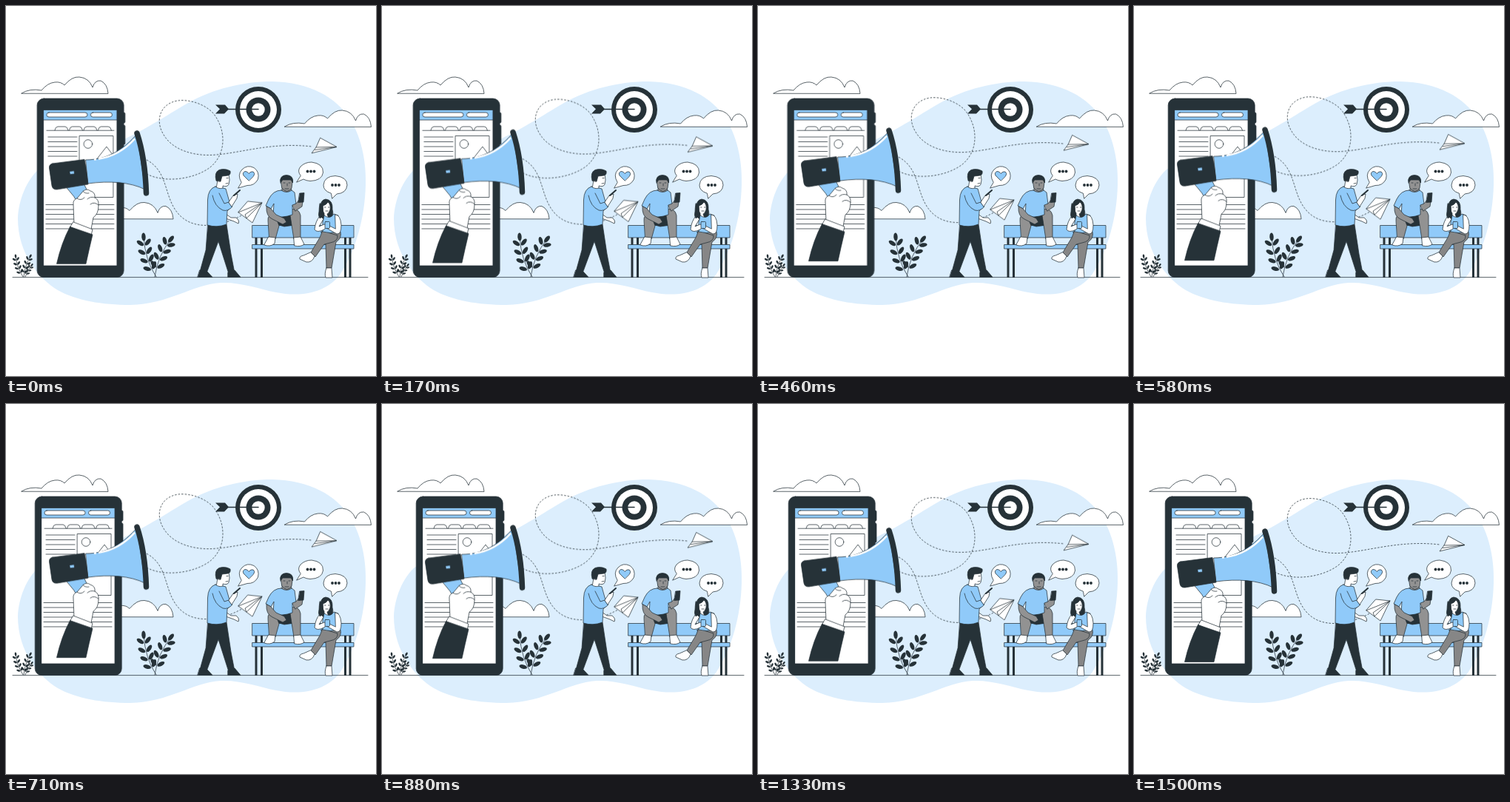
An HTML page for the animation above (1.54 s loop, 500 by 500 pixels).

```html
<!DOCTYPE html>
<html lang="en">
<head>
<meta charset="utf-8">
<title>Social promotion</title>
<style>
  html, body { margin: 0; width: 100%; height: 100%; overflow: hidden; background: #fff; }
  svg { display: block; width: 100%; height: 100%; }
  .art { --dark: #263238; --blue: #90caf9; stroke: var(--dark); stroke-width: .75; stroke-linejoin: round; stroke-linecap: round; }
  .w { fill: #fff; }
  .b { fill: var(--blue); }
  .d { fill: var(--dark); }
  .g { fill: #929292; }
  .p { fill: #868686; }
  .n { fill: none; }
  .flat { stroke: none; }
  .dash { fill: none; stroke-dasharray: 2.6 1.9; stroke-linecap: butt; }
  .float { animation: float 1540ms -20ms linear infinite; }
  .shake { animation: shake 1540ms -20ms linear infinite; }
  /* 1500 ms cycles followed by a 40 ms rest */
  @keyframes float {
    0%, 97.4%, 100% { transform: translateY(0); }
    48.7% { transform: translateY(-6px); }
  }
  @keyframes shake {
    0%, 97.4%, 100% { transform: translateX(0); }
    9.74%, 87.66% { transform: translateX(-1px); }
    19.48%, 77.92% { transform: translateX(2px); }
    29.22%, 48.7%, 68.18% { transform: translateX(-4px); }
    38.96%, 58.44% { transform: translateX(4px); }
  }
</style>
</head>
<body>
<svg class="art" viewBox="0 0 500 500">
  <defs>
    <path id="cloud" d="M21 118Q32 111 48 114Q56 104 66 103Q74 102 79 107Q89 95 99 96Q112 97 117 110Q120 100 128 101Q137 105 138 118Z"/>
    <path id="tab" d="M66 168Q67 163 70 163H80Q83 163 84 168"/>
    <circle id="dot" r="1.9"/>
  </defs>

  <path class="flat" fill="#dceefd" d="M16 287C17 262 28 235 44 221C75 202 120 199 160 180C195 163 215 149 246 131C280 112 320 102 360 102C410 103 446 123 465 153C482 180 487 215 486 242C485 285 473 330 452 362C434 387 400 394 365 387C340 382 318 373 290 374C250 377 220 403 168 404C130 404 95 398 70 384C45 369 16 335 16 287Z"/>
  <g class="w">
    <use href="#cloud"/>
    <use href="#cloud" x="355.5" y="45"/>
    <use href="#cloud" x="88" y="169.5"/>
  </g>
  <path class="n" d="M9 366.6H489"/>
  <g id="plants" class="d"></g>

  <!-- target -->
  <g class="flat">
    <circle class="d" cx="341" cy="140" r="31"/>
    <circle class="w" cx="341" cy="140" r="25"/>
    <circle class="d" cx="341" cy="140" r="16.5"/>
    <circle class="w" cx="341" cy="140" r="8.7"/>
    <path class="d" d="M283 133.5H296L301 139.3L295 145.5H283L289 139.3Z"/>
  </g>
  <path class="n" stroke-width="1.5" d="M290 139.4H341"/>

  <!-- bench -->
  <g>
    <path class="d" d="M338 313V367M345.500 313V367M458.500 313V367M465 313V367" stroke-width="3" stroke-linecap="butt"/>
    <rect class="b" x="333" y="296.5" width="137" height="16.5"/>
    <rect class="b" x="333" y="322.5" width="137" height="5.5"/>
  </g>

  <!-- phone -->
  <g class="shake">
    <rect class="d" x="157" y="144" width="4" height="14" rx="1.5"/>
    <rect class="d" x="157" y="161" width="4" height="26" rx="1.5"/>
    <rect class="d" x="42.2" y="125" width="117" height="241.6" rx="9"/>
    <rect class="w" x="51" y="140.5" width="99" height="210.5"/>
    <rect class="b" x="51" y="140.5" width="99" height="13.5"/>
    <rect class="w" x="55" y="144" width="55" height="6" rx="3"/>
    <rect class="w" x="114.5" y="144" width="29" height="6" rx="3"/>
    <g class="n">
      <use href="#tab"/><use href="#tab" x="19.5"/><use href="#tab" x="39"/><use href="#tab" x="58.5"/>
      <path d="M55 168.2H146M57 177H96M57 183.5H96M57 190H96M57 196.5H96M57 203H96"/>
      <rect x="99.5" y="175.5" width="45.5" height="83"/>
      <circle cx="111" cy="186.5" r="5.8"/>
      <path d="M118 213L136 190L145 202M54 268.5H146M54 275H146M54 281.5H146M54 288H146M54 294.500H146M54 301H146"/>
    </g>
  </g>

  <!-- flight paths and paper planes -->
  <g class="float">
    <path class="dash" d="M190 227C215 240 255 234 276 218C299 199 297 166 280 145C268 132 247 126 232 128C208 132 201 155 213 174C225 195 255 204 285 201C320 198 360 184 413 190"/>
    <path class="dash" d="M190 208C216 222 214 249 226 271C237 291 254 297 273 296.5C295 295 310 288 322 281"/>
    <path class="w" d="M425 178.5L447 190.5L413 199L419 191Z"/>
    <path class="n" d="M419 191L447 190.5L417.500 194.500"/>
    <path class="w" d="M327 264L346 266L333 293L314 279Z"/>
    <path class="n" d="M314 279L346 266L323 282L325 287L346 266"/>
  </g>

  <!-- megaphone -->
  <g class="float">
    <path class="b" d="M81 244L104 238L109 248L98 262Q94 263 92 258Z"/>
    <path class="b" d="M108 208C137 208 159 194 177 173L188 248C168 238 140 236 111 240Z"/>
    <path class="n" style="stroke:#fff" stroke-width="2.6" stroke-linecap="butt" d="M119 207.5L122 207.2M125 206.7C144 204 161 194 174 179.5"/>
    <path class="d" d="M63 213L106 207.5Q109 222 111 241L69 248Q63 248.5 62 243L58.5 219Q58 214 63 213Z"/>
    <path class="n" stroke-width="7.5" d="M177 172Q188 205 189.5 253"/>
    <path class="b" d="M86 223.5L92 222.8L92.6 227L86.6 227.7Z"/>
    <path class="w" d="M92 295L91 269Q90 262 96 260L104 250.5Q109 246 114 250Q121 252 120 259Q126 262 125 270Q125 281 118 286L115 302Z"/>
    <path class="n" d="M96 260Q101 264 106 259M104 250.5Q107 254 112 253M120 259Q114 257 110 261M125 269Q119 264 114 268"/>
    <path class="w" d="M91 292L117 302L115 310L87 299Z"/>
    <path class="d" d="M86.5 298.5L117 309Q112 330 108 348.5H68.5Q75 320 86.5 298.5Z"/>
  </g>

  <!-- walking man -->
  <g>
    <path class="w" d="M297 281L304 286L311 286Q316 290 314 294L308 291L297 287Z"/>
    <path class="w" d="M290 228L301 227L302 235L301 241Q299 245 293 243L293 250L284 247L286 235Z"/>
    <path class="d" d="M284 236Q281 225 288 221.5Q296 219 303 223Q304 228 300 229L292 230L290 237Z"/>
    <path class="n" d="M298 232.5H300M297 240L300 239.5"/>
    <path class="d" d="M262 357L272 359L279 366.5H259Z"/>
    <path class="d" d="M300 360L309 357L317 366.5H300Z"/>
    <path class="d" d="M273 294L298 295L304 335L309 361L301 362L287 318L271 361L262 359L270 330Z"/>
    <path class="b" d="M283 244Q273 247 272.5 262L272 296Q285 300 298 295L299 277L304 272L297 247L293 246Q288 248 283 244Z"/>
    <path class="b" d="M279 256Q282 271 293 276Q300 278 306 271L301 265L295 267L288 253"/>
    <path class="w" d="M301 265L307 256L313 254L312 260L305 271Z"/>
    <path class="n" stroke-width="2" d="M308 256L316 249"/>
  </g>

  <!-- seated man -->
  <g>
    <path class="g" d="M373 242L373 251Q379 255 386 250L385 243Z"/>
    <path class="g" d="M371 235Q371 231 379 231Q388 231 387 238L386 246Q380 255 373 246Z"/>
    <path class="d" d="M371 239Q369 229 379 228.500Q389 229 387.500 239L385 235H374Z"/>
    <path class="n" d="M375 239H377M382 239H384M380 240V243M377 247H382"/>
    <path class="d" d="M360 283H390V296L376 298L362 294Z"/>
    <path class="g" d="M383 275Q396 272 398 283L398 315H389L386 296Z"/>
    <path class="g" d="M354 290Q353 280 364 283L369 297L364 315H356Z"/>
    <path class="w" d="M355 312L364 313L363 321Q357 326 349 323Z"/>
    <path class="w" d="M389 313L398 312L403 322Q398 326 390 324Z"/>
    <path class="b" d="M372 249Q361 249 355 261L351 270L358 274L362 267L361 284Q374 287 387 282L387 270L392 268L390 252L386 249Q379 254 372 249Z"/>
    <path class="g" d="M352 271Q351 284 360 288L374 295L379 292L376 287L365 282L358 274Z"/>
    <path class="g" d="M387 269L392 267L396 262L401 264L400 271L391 277Z"/>
    <path class="d" d="M397 253L403 252.5L402 265L395 265.5Z"/>
  </g>

  <!-- seated woman -->
  <g>
    <path class="d" d="M425 275Q424 262 432 261Q442 262 441 275Q443 282 440 286L425 289Q420 282 425 275Z"/>
    <path class="w" d="M428 270Q433 269 435 265Q439 268 438 275Q436 281 434 281L436 287H430L430 280Q427 276 428 270Z"/>
    <path class="n" d="M430.5 272H432M435.5 272H437M432 277H435"/>
    <path class="p" d="M426 305H452Q454 314 446 319L440 354H433L432 321Z"/>
    <path class="p" d="M428 304L448 310Q449 318 438 320L430 322L418 339L412 333L424 313Z"/>
    <path class="w" d="M412 333L417 338Q414 347 406 346L397 342Q396 338 402 337Z"/>
    <path class="w" d="M433 354H440L441 367H432Q430 362 433 354Z"/>
    <path class="b" d="M430 283L428 292V305Q438 308 449 305V283L443 281Q438 289 430 283Z"/>
    <path class="w" d="M445 282Q452 282 453 296Q453 309 447 308L433 300L435 296L445 301Z"/>
    <path class="w" d="M424 284Q418 291 417 302Q420 307 430 302L434 297L430 295L423 298L429 288Z"/>
    <path class="d" d="M424 267Q422 280 424 287Q430 285 428 269Z"/>
    <rect class="b" x="431" y="291.5" width="6.5" height="9" rx="1"/>
  </g>

  <!-- speech bubbles -->
  <path class="w" d="M398 229Q393 223 398 217Q404 211 413 211Q429 213 428.5 225Q427 236 411 236.5Q405 236 402 234L393 238Z"/>
  <path class="w" d="M439 253Q429 250 429 242Q430 230 445 229.5Q461 231 461 242Q460 253 447 254L441 260Z"/>
  <path class="w" d="M318 238Q312 228 319 221Q326 214 335 218.5Q343 224 340.5 234Q336 243 326 242.5L314 246Z"/>
  <path class="b" d="M328 236L321 229Q319 225 323 223.5Q326 223 328 226.5Q331 223 334 224Q337 226 334.5 230Z"/>
  <g class="d flat">
    <use href="#dot" x="407.5" y="223.5"/><use href="#dot" x="412" y="223.5"/><use href="#dot" x="416.5" y="223.5"/>
    <use href="#dot" x="441" y="242"/><use href="#dot" x="445.5" y="242"/><use href="#dot" x="450" y="242"/>
  </g>
</svg>
<script>
  const plants = document.getElementById('plants');

  function add(tag, attrs) {
    const el = document.createElementNS('http://www.w3.org/2000/svg', tag);
    for (const key in attrs) el.setAttribute(key, attrs[key]);
    plants.append(el);
  }

  // A curved stem with leaves in pairs and one at the tip.
  function sprig([x0, y0], [x1, y1], [x2, y2], pairs, size) {
    add('path', { class: 'n', d: `M${x0} ${y0}Q${x1} ${y1} ${x2} ${y2}` });
    const leaf = (x, y, turn, k) => add('ellipse', {
      class: 'flat', cx: k * size, cy: 0, rx: size, ry: size * .5,
      transform: `translate(${x} ${y}) rotate(${turn})`
    });
    for (let i = 0; i <= pairs; i++) {
      const t = .2 + .8 * i / pairs, u = 1 - t;
      const x = u * u * x0 + 2 * u * t * x1 + t * t * x2;
      const y = u * u * y0 + 2 * u * t * y1 + t * t * y2;
      const dx = u * (x1 - x0) + t * (x2 - x1), dy = u * (y1 - y0) + t * (y2 - y1);
      const dir = Math.atan2(dy, dx) * 180 / Math.PI;
      if (i === pairs) leaf(x, y, dir, 0);
      else for (const side of [-48, 48]) leaf(x, y, dir + side, 1.3);
    }
  }

  sprig([203, 366], [188, 344], [186, 312], 4, 5.4);
  sprig([201, 366], [205, 337], [223, 315], 4, 5.4);
  sprig([23, 366], [15, 354], [13, 338], 4, 2.6);
  sprig([24, 366], [25, 352], [33, 338], 4, 2.6);
  sprig([26, 366], [29, 357], [35, 350], 3, 2.2);
</script>
</body>
</html>
```
